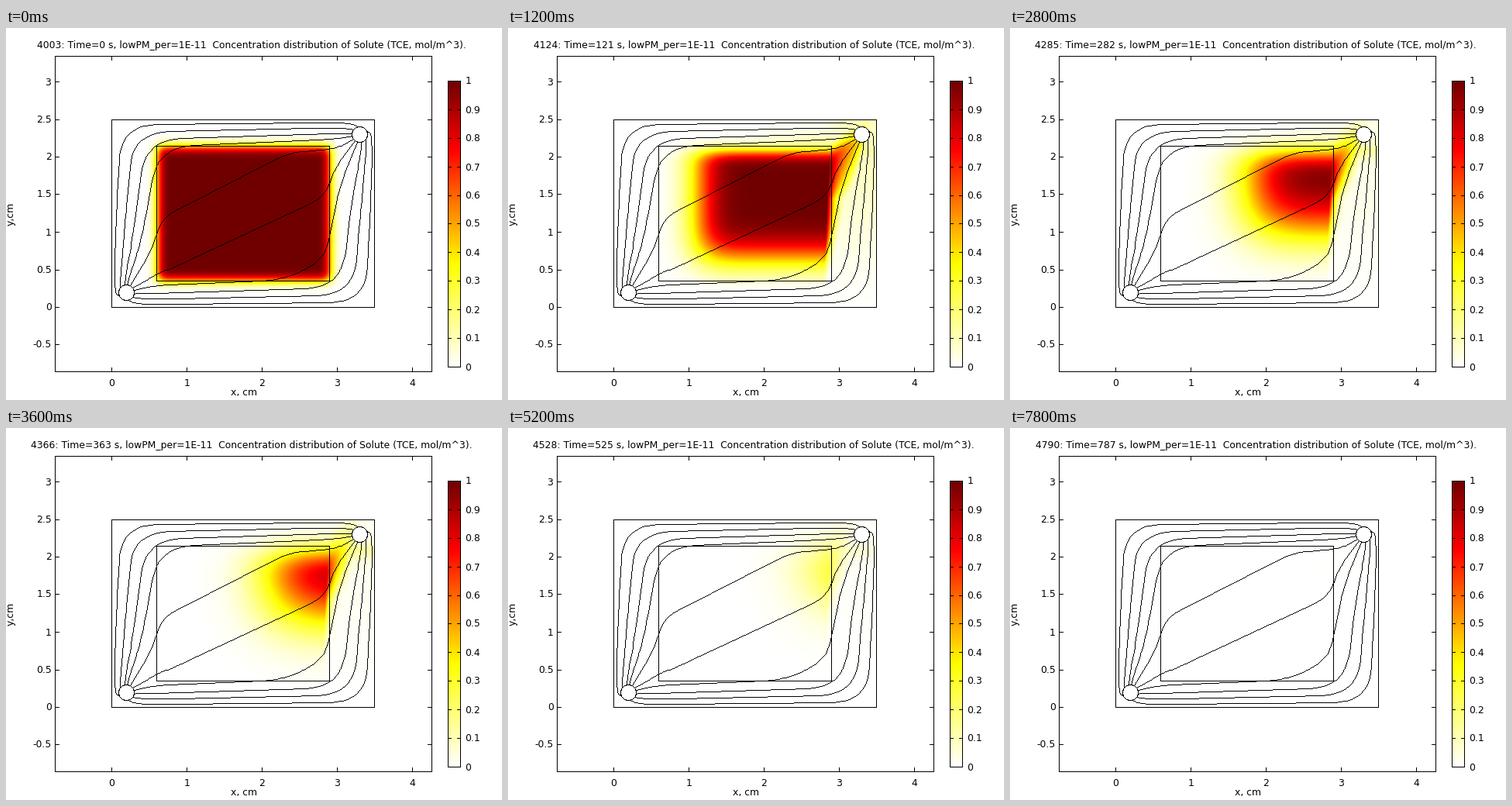
Animation, 640 px wide and 480 px high, one loop 8 s. Source, as a matplotlib script:

```python
import numpy as np
import matplotlib.pyplot as plt
from matplotlib.animation import FuncAnimation
from matplotlib.colors import LinearSegmentedColormap

W, H = 640, 480
FRAMES, INTERVAL = 40, 200
STEP = 20.175              # simulated seconds per frame
FONT = 12.33 * 0.72
X0, Y0, SCALE = 136, 360, 97
LEFT, TOP, RIGHT, BOTTOM = 194, 152, 417, 326      # the block
WELLS = (155, 341), (456, 137)

plt.rcParams["font.family"] = "DejaVu Sans"
fig = plt.figure(figsize=(W / 100, H / 100), dpi=100, facecolor="white")
ax = fig.add_axes([0, 0, 1, 1])
ax.axis("off")

heat = LinearSegmentedColormap.from_list("heat", [
    (0, (1, 1, 1)), (0.36, (1, 1, 0)), (0.76, (1, 0, 0)), (1, (0.44, 0, 0))], N=512)
ink = np.zeros((H, W, 4), np.uint8)                # layer of crisp one-pixel lines


def stroke(points):
    p = np.rint(points).astype(int)
    for a, b in zip(p, p[1:]):
        n = max(np.abs(b - a).max(), 1)
        x, y = np.rint(np.linspace(a, b, n + 1)).astype(int).T
        ink[y, x] = 0, 0, 0, 255


def box(x0, y0, x1, y1):
    stroke([(x0, y0), (x1, y0), (x1, y1), (x0, y1), (x0, y0)])


def tick_pair(a, b, step):
    """Two opposite ticks pointing inwards from a and b."""
    a, b, step = np.array(a), np.array(b), np.array(step)
    stroke([a, a + step])
    stroke([b, b - step])


def label(x, y, s, ha="center", **kw):
    return ax.text(x, y, s, ha=ha, va="baseline", fontsize=FONT, color="black", **kw)


def rounded(points, r):
    """Polyline whose corners are replaced by quadratic curves."""
    p = np.array(points, float)
    s = np.linspace(0, 1, 13)[:, None]
    out = [p[:1]]
    for a, b, c in zip(p, p[1:], p[2:]):
        u = b + (a - b) * min(0.5, r / np.hypot(*(a - b)))
        v = b + (c - b) * min(0.5, r / np.hypot(*(c - b)))
        out.append((1 - s) ** 2 * u + 2 * s * (1 - s) * b + s ** 2 * v)
    return np.vstack(out + [p[-1:]])


def phi(z):
    """Normal distribution function."""
    return 0.5 * (1 + np.tanh(0.798 * z + 0.0357 * z ** 3))


def ramp(v):
    v = np.clip(v, 0, 1)
    return v * v * (3 - 2 * v)


# Concentration: fronts sweep the block, then a plume bends towards the outlet
gx, gy = np.meshgrid(np.arange(136, 476.0), np.arange(118, 361.0))
edge = 414 - 0.04 * (gy - 160)                 # downstream face of the block
dx = np.maximum(gx - edge, 0)
bx = np.minimum(gx, edge)
exit_y = gy + 2 * dx + 0.03 * dx ** 2          # where the water left the block
decay = np.exp(-dx / (10 + 35 * np.clip((220 - gy) / 70, 0, 1)))
rinse = np.exp(-np.maximum(LEFT - gx, 0) / 3 - np.maximum(gy - BOTTOM, 0) / 8)
start = (phi((gx - LEFT - 1) / 6.5) * phi((RIGHT + 1 - gx) / 6.5)
         * phi((gy - TOP - 0.5) / 6.5) * phi((BOTTOM - 0.5 - gy) / 6.5))
haze = ramp((gx - 390) / 50) * ramp((390 - gy) / 240)
layer = np.exp(-np.abs(158 - gy) / (2 + 12 * np.clip((gx - LEFT) / 250, 0, 1)) - dx / 60)


def field(t):
    spread = np.sqrt(42 + 3.8 * t)
    left = phi((bx - 195 - 0.415 * t) / spread)
    low = 324 - 0.235 * t
    top_y = 153.5 + 9 * (1 - np.exp(-t / 120))
    top = phi((gy + 0.8 * dx - top_y) / (5 + 0.034 * t))
    plume = left * phi((low - exit_y) / spread) * top * decay
    film = 0.34 * left * phi((low - 160) / spread) * layer
    pale = 0.17 * np.exp(-t / 180) * haze
    mixed = np.maximum(np.maximum(plume, film) * rinse, pale)
    w = 1 - np.exp(-t / 12)
    return (1 - w) * start + w * mixed


cloud = ax.imshow(field(0), cmap=heat, vmin=0, vmax=1, extent=(136, 476, 361, 118),
                  interpolation="nearest", zorder=1)
ax.imshow(np.linspace(1, 0, 370)[:, None], cmap=heat, vmin=0, vmax=1,
          extent=(570, 587, 438, 68), interpolation="nearest", zorder=1)

# Streamlines: a nested family around the block and three through it
outer = np.array([(147, 346), (139, 342), (141, 260), (148, 125), (440, 121), (455, 128)])
rim = np.array([(156, 331), (160, 316), (174, 275), (196, 153), (425, 143), (447, 139)])
for k in range(4):
    path = rounded(outer + (rim - outer) * k / 3, 45)
    stroke(path)
    if k < 3:
        stroke((611.5, 478) - path)
for inner in (
        [(160, 332), (186, 290), (201, 244), (366, 160), (424, 156), (448, 143)],
        [(163, 335), (200, 314), (214, 310), (411, 217), (424, 180), (450, 145)],
        [(165, 338), (190, 332), (350, 325), (384, 313), (412, 293), (430, 205), (453, 147)]):
    stroke(rounded(inner, 20))

# Wells
rows, cols = np.mgrid[:H, :W]
turn = np.linspace(0, 2 * np.pi, 73)
for x, y in WELLS:
    ink[np.hypot(cols - x, rows - y) < 10] = 255
    stroke(np.column_stack([x + 10 * np.cos(turn), y + 10 * np.sin(turn)]))

# Axes, ticks and labels
box(63, 36, 549, 443)
box(136, 118, 475, 360)
box(LEFT, TOP, RIGHT, BOTTOM)
box(570, 68, 586, 437)
for v in range(5):
    x = X0 + SCALE * v
    tick_pair((x, 36), (x, 443), (0, 5))
    label(x + 0.5, 461.5, f"{v}")
for v in np.arange(-0.5, 3.1, 0.5):
    y = round(Y0 - SCALE * v)
    tick_pair((63, y), (549, y), (5, 0))
    label(59, y + 4.5, f"{v:g}", "right")
for i in range(11):
    y = round(437 - 36.9 * i)
    tick_pair((570, y), (586, y), (4, 0))
    label(592.5, y + 4.5, f"{i / 10:g}", "left")
label(307, 474, "x, cm")
label(9.5, 239.5, "y,cm", rotation=90, rotation_mode="anchor")
title = label(317.3, 26, "")

ax.imshow(ink, extent=(0, W, H, 0), interpolation="nearest", zorder=3)
ax.set_aspect("auto")
ax.set_xlim(0, W)
ax.set_ylim(H, 0)


def draw(n):
    s = int(STEP * n + 0.5)
    cloud.set_data(field(STEP * n))
    title.set_text(f"{4003 + s}: Time={s} s, lowPM_per=1E-11  "
                   "Concentration distribution of Solute (TCE, mol/m^3).")
    return cloud, title


anim = FuncAnimation(fig, draw, frames=FRAMES, interval=INTERVAL, repeat=True, blit=False)
plt.show()
```
